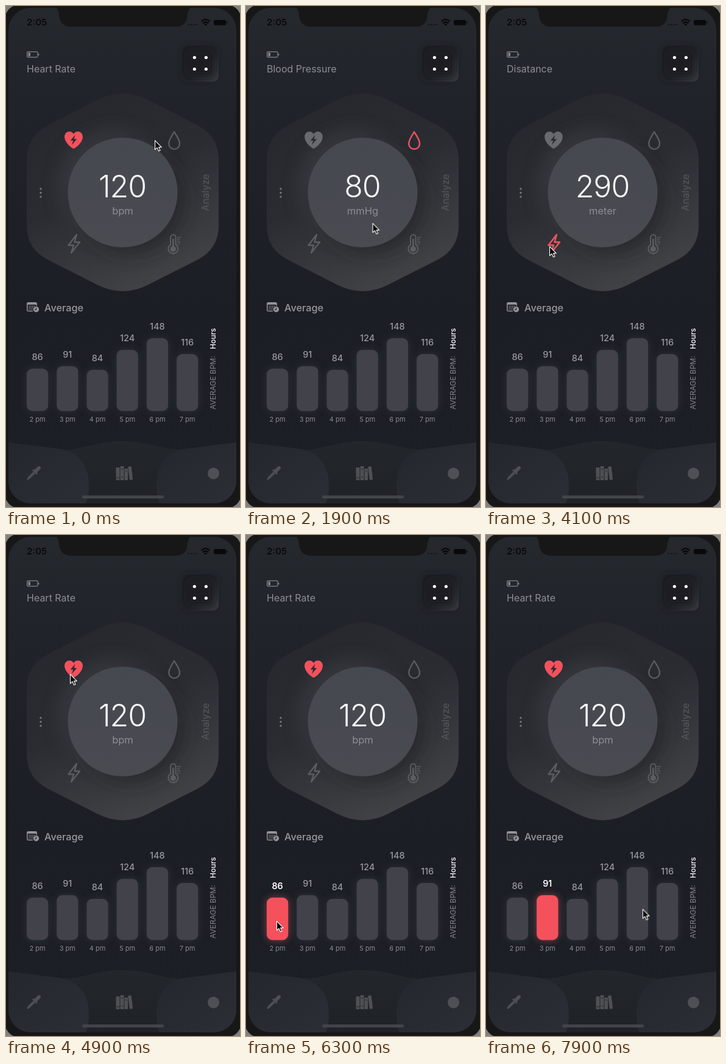
An HTML page that plays this animation: 384x822 px, repeating every 8 s.

```html
<!DOCTYPE html>
<html lang="en">
<head>
<meta charset="utf-8">
<title>Heart Rate</title>
<style>
html, body { margin: 0; width: 100%; height: 100%; overflow: hidden; background: #808080; }
svg { display: block; width: 384px; height: 822px; font-family: Inter, Roboto, "Liberation Sans", sans-serif; }
.idle { color: #5b5d62; }
.lit { color: #f4515d; }
.title { font-size: 16px; fill: #8c8e94; }
.num { font-size: 50px; font-weight: 350; letter-spacing: -1px; fill: #f7f7f8; text-anchor: middle; }
.unit { font-size: 16.5px; fill: #8c8e94; text-anchor: middle; }
.val { font-size: 14.5px; font-weight: 500; fill: #98999d; text-anchor: middle; }
.hour { font-size: 11px; fill: #8a8b90; text-anchor: middle; }
.bar { fill: #42424a; filter: drop-shadow(0 0 7px rgba(80, 82, 92, .35)); }
.on .bar { fill: #f4515d; filter: drop-shadow(0 0 6px rgba(244, 81, 93, .4)); }
.on .val { fill: #fff; }

/* Selected gauge: hard switches */
.heart, .drop, .temp, .bolt { animation: 8s step-end infinite; }
.heart { animation-name: heart; }
.drop { animation-name: drop; }
.temp { animation-name: temp; }
.bolt { animation-name: bolt; }
@keyframes heart { 0% { opacity: 1 } 15% { opacity: 0 } 61.25%, 100% { opacity: 1 } }
@keyframes drop { 0% { opacity: 0 } 15% { opacity: 1 } 31.25%, 100% { opacity: 0 } }
@keyframes temp { 0% { opacity: 0 } 31.25% { opacity: 1 } 48.75%, 100% { opacity: 0 } }
@keyframes bolt { 0% { opacity: 0 } 48.75% { opacity: 1 } 61.25%, 100% { opacity: 0 } }

/* Selected bar: short fades */
.first { animation: first 8s linear infinite; }
.second { animation: second 8s linear infinite; }
@keyframes first { 0%, 74.4% { opacity: 0 } 78.1%, 88.1% { opacity: 1 } 92%, 100% { opacity: 0 } }
@keyframes second { 0%, 88.1% { opacity: 0 } 92%, 100% { opacity: 1 } }

/* Pointer moves once per 100 ms */
.pointer { animation: move 8s infinite; }
@keyframes move {
  0% { transform: translate(244px, 220px); animation-timing-function: steps(5) }
  6.25% { transform: translate(262px, 221px); animation-timing-function: steps(4) }
  11.25% { transform: translate(286px, 220px); animation-timing-function: steps(2) }
  13.75% { transform: translate(283px, 219px); animation-timing-function: steps(1) }
  15% { transform: translate(290px, 222px); animation-timing-function: steps(1) }
  16.25% { transform: translate(285px, 221px); animation-timing-function: steps(1) }
  17.5% { transform: translate(285px, 221px); animation-timing-function: steps(2) }
  20% { transform: translate(235px, 258px); animation-timing-function: steps(2) }
  22.5% { transform: translate(179px, 322px); animation-timing-function: steps(2) }
  25% { transform: translate(236px, 390px); animation-timing-function: steps(1) }
  26.25% { transform: translate(268px, 409px); animation-timing-function: steps(2) }
  28.75% { transform: translate(279px, 400px); animation-timing-function: steps(2) }
  31.25% { transform: translate(277px, 393px); animation-timing-function: steps(3) }
  35% { transform: translate(277px, 393px); animation-timing-function: steps(2) }
  37.5% { transform: translate(282px, 403px); animation-timing-function: steps(2) }
  40% { transform: translate(262px, 398px); animation-timing-function: steps(2) }
  42.5% { transform: translate(215px, 378px); animation-timing-function: steps(2) }
  45% { transform: translate(148px, 380px); animation-timing-function: steps(2) }
  47.5% { transform: translate(110px, 390px); animation-timing-function: steps(3) }
  51.25% { transform: translate(104px, 394px); animation-timing-function: steps(1) }
  52.5% { transform: translate(104px, 394px); animation-timing-function: steps(3) }
  56.25% { transform: translate(99px, 335px); animation-timing-function: steps(3) }
  60% { transform: translate(104px, 232px); animation-timing-function: steps(3) }
  63.75% { transform: translate(107px, 220px); animation-timing-function: steps(1) }
  65% { transform: translate(106px, 219px); animation-timing-function: steps(1) }
  66.25% { transform: translate(106px, 219px); animation-timing-function: steps(1) }
  67.5% { transform: translate(121px, 330px); animation-timing-function: steps(1) }
  68.75% { transform: translate(147px, 475px); animation-timing-function: steps(1) }
  70% { transform: translate(125px, 566px); animation-timing-function: steps(2) }
  72.5% { transform: translate(72px, 612px); animation-timing-function: steps(2) }
  75% { transform: translate(48px, 632px); animation-timing-function: steps(6) }
  82.5% { transform: translate(52px, 634px); animation-timing-function: steps(2) }
  85% { transform: translate(92px, 634px); animation-timing-function: steps(1) }
  86.25% { transform: translate(105px, 631px); animation-timing-function: steps(3) }
  90% { transform: translate(108px, 632px); animation-timing-function: steps(3) }
  93.75% { transform: translate(176px, 623px); animation-timing-function: steps(5) }
  100% { transform: translate(277px, 611px) }
}
</style>
</head>
<body>
<svg viewBox="0 0 384 822">
  <defs>
    <linearGradient id="screen" x1="0" y1="0" x2="0" y2="1">
      <stop offset="0" stop-color="#25292e"/><stop offset=".2" stop-color="#202329"/>
      <stop offset=".6" stop-color="#1b1e24"/><stop offset="1" stop-color="#1c1f25"/>
    </linearGradient>
    <linearGradient id="hex" x1=".25" y1="0" x2=".7" y2="1">
      <stop offset="0" stop-color="#26282e"/><stop offset=".45" stop-color="#2b2c32"/>
      <stop offset="1" stop-color="#434447"/>
    </linearGradient>
    <linearGradient id="disc" x1="0" y1="0" x2="0" y2="1">
      <stop offset="0" stop-color="#45484f"/><stop offset="1" stop-color="#494b51"/>
    </linearGradient>
    <linearGradient id="key" x1="0" y1="0" x2="1" y2="1">
      <stop offset="0" stop-color="#1b1c20"/><stop offset=".55" stop-color="#202227"/>
      <stop offset="1" stop-color="#37393d"/>
    </linearGradient>
    <linearGradient id="lobe" x1="0" y1="0" x2="1" y2="1">
      <stop offset="0" stop-color="#24272d"/><stop offset="1" stop-color="#2c2e36"/>
    </linearGradient>
    <linearGradient id="mid" x1="0" y1="0" x2="0" y2="1">
      <stop offset="0" stop-color="#23262b"/><stop offset="1" stop-color="#1f2227"/>
    </linearGradient>
    <filter id="blur4" x="-50%" y="-50%" width="200%" height="200%"><feGaussianBlur stdDeviation="4"/></filter>
    <filter id="blur14" x="-50%" y="-50%" width="200%" height="200%"><feGaussianBlur stdDeviation="14"/></filter>
    <clipPath id="phone"><rect x="4" y="3" width="374" height="813" rx="37"/></clipPath>
    <path id="hexagon" d="M150 154Q191.500 133 233 154L313 195Q349 213 349 252V360Q349 399 313 417L233 457.500Q191.500 478.500 150 457.500L70 417Q34 399 34 360V252Q34 213 70 195Z"/>
    <clipPath id="inside"><use href="#hexagon"/></clipPath>

    <g id="i-heart">
      <path fill="currentColor" d="M111 234C109.500 234 96.200 225 96.200 214.500C96.200 209.500 99.800 206 104 206C107.200 206 109.700 207.800 111 210.300C112.300 207.800 114.800 206 118 206C122.200 206 125.800 209.500 125.800 214.500C125.800 225 112.500 234 111 234Z"/>
      <path fill="#292b31" d="M113.500 211.500L105.800 220.800H110.300L108 228L116.200 218.300H111.500Z"/>
    </g>
    <path id="i-drop" fill="none" stroke="currentColor" stroke-width="2.300" stroke-linejoin="round" d="M276 206.500C273 212 267.200 219 267.200 226A8.900 8.900 0 0 0 285 226C285 219 279 212 276 206.500Z"/>
    <path id="i-bolt" fill="none" stroke="currentColor" stroke-width="2.300" stroke-linejoin="round" d="M116 375L102.500 392.500H111L107 405L121 387.500H112.500Z"/>
    <g id="i-temp" fill="none" stroke="currentColor" stroke-width="1.900">
      <path d="M270 391.500V379.500A4.300 4.300 0 0 1 278.600 379.500V391.500A8 8 0 1 1 270 391.500Z"/>
      <circle cx="274.300" cy="398.700" r="4.700" fill="currentColor" stroke="none"/>
      <path d="M274.300 382V398" stroke-width="2.600"/>
      <path d="M281 380H286.500M281 383.500H285M281 387H286.500M281 390.500H285" stroke-width="1.700"/>
    </g>
  </defs>

  <rect x="-2" y="-2" width="388" height="826" rx="24" fill="#171718"/>
  <g clip-path="url(#phone)">
    <rect width="384" height="822" fill="url(#screen)"/>
    <path fill="#171718" d="M78 0Q86 3 87 14Q88 34 107 34H278Q297 34 298 14Q299 3 307 0Z"/>

    <path fill="url(#mid)" d="M4 716L100 728C140 724 150 714 191 714C232 714 242 724 282 728L378 716V816H4Z"/>
    <path fill="url(#lobe)" d="M4 716L88 727C122 731 136 757 136 786Q136 805 131 816H4Z"/>
    <path fill="url(#lobe)" d="M378 716L295 727C261 731 247 757 247 786Q247 805 252 816H378Z"/>
    <rect x="125" y="803" width="134" height="5" rx="2.500" fill="#424449"/>
  </g>

  <!-- status bar -->
  <g fill="#09090a">
    <text x="34" y="32" font-size="15" font-weight="600">2:05</text>
    <rect x="341" y="23" width="20" height="8.500" rx="2"/>
    <rect x="362" y="25.500" width="1.500" height="3.500" rx=".7"/>
    <path fill="none" stroke="#09090a" stroke-width="2.300" d="M320.500 25.300Q327.500 18.800 334.500 25.300M323 28.300Q327.500 24.300 332 28.300"/>
    <path d="M327.500 32.500L324.800 30Q327.500 27.800 330.200 30Z"/>
    <path stroke="#101012" stroke-width="2" stroke-dasharray="2 2.300" d="M299 30.500H314"/>
  </g>

  <!-- heading -->
  <rect x="34.600" y="75.100" width="17.400" height="9" rx="1.500" fill="none" stroke="#85868a" stroke-width="1.200"/>
  <path fill="#85868a" d="M36.300 76.800H40V82.400H36.300ZM53 78H54.200V81.300H53Z"/>
  <rect x="288" y="64" width="59" height="59" rx="10" fill="#15171a" opacity=".45" filter="url(#blur4)"/>
  <rect x="290" y="66" width="59" height="58" rx="9" fill="url(#key)"/>
  <rect x="297" y="72" width="43" height="43" rx="8" fill="#1b1d21" filter="url(#blur4)"/>
  <g fill="#fff"><circle cx="309.300" cy="84.500" r="2.600"/><circle cx="328.300" cy="84.500" r="2.600"/><circle cx="309.300" cy="103.500" r="2.600"/><circle cx="328.300" cy="103.500" r="2.600"/></g>

  <!-- gauge -->
  <use href="#hexagon" fill="url(#hex)"/>
  <g clip-path="url(#inside)">
    <circle cx="177" cy="294" r="90" fill="#44464c" opacity=".5" filter="url(#blur14)"/>
    <circle cx="206" cy="320" r="88" fill="#222328" opacity=".6" filter="url(#blur14)"/>
  </g>
  <circle cx="191.500" cy="306" r="90" fill="url(#disc)"/>
  <g fill="#73757a"><circle cx="57" cy="300" r="1.700"/><circle cx="57" cy="306.500" r="1.700"/><circle cx="57" cy="313" r="1.700"/></g>
  <text transform="translate(333 306) rotate(-90)" text-anchor="middle" font-size="16.200" fill="#55575c">Analyze</text>
  <g class="idle"><use href="#i-heart" color="#686a70"/><use href="#i-drop"/><use href="#i-bolt"/><use href="#i-temp"/></g>

  <g class="lit heart">
    <use href="#i-heart"/><text class="title" x="34" y="109">Heart Rate</text>
    <text class="num" x="191" y="314">120</text><text class="unit" x="191.500" y="342">bpm</text>
  </g>
  <g class="lit drop">
    <use href="#i-drop"/><text class="title" x="34" y="109">Blood Pressure</text>
    <text class="num" x="191" y="314">80</text><text class="unit" x="191.500" y="342">mmHg</text>
  </g>
  <g class="lit temp">
    <use href="#i-temp"/><text class="title" x="34" y="109">Temparature</text>
    <text class="num" x="191" y="314">98.7</text><text class="unit" x="191.500" y="342">degree</text>
  </g>
  <g class="lit bolt">
    <use href="#i-bolt"/><text class="title" x="34" y="109">Disatance</text>
    <text class="num" x="191" y="314">290</text><text class="unit" x="191.500" y="342">meter</text>
  </g>

  <!-- chart -->
  <g fill="none" stroke="#929397" stroke-width="1.500">
    <path d="M44 500.500H36.500Q34.800 500.500 34.800 498.800V488.500Q34.800 486.800 36.500 486.800H48.500Q50.200 486.800 50.200 488.500V492"/>
    <path d="M35 488.500H50" stroke-width="3"/>
    <path d="M37.500 492.500H48M37.500 495H45M37.500 497.500H44" stroke-dasharray="1.500 1.200"/>
    <circle cx="49.500" cy="497.800" r="4.700" fill="#929397" stroke="none"/>
    <path d="M49.500 495V498.200H47" stroke="#1c1f24" stroke-width="1.100"/>
  </g>
  <text x="63" y="501" font-size="16.300" font-weight="500" fill="#98999d">Average</text>
  <g id="chart"></g>
  <text transform="translate(344 662) rotate(-90)" font-size="12" fill="#85868b">AVERAGE BPM:</text>
  <text transform="translate(344 563) rotate(-90)" font-size="12" font-weight="500" fill="#fff">Hours</text>

  <!-- tab icons -->
  <g fill="#4e5054">
    <path d="M46.500 761.500L49 759L52 756Q54.500 754 56.300 755.800Q58 757.600 56 760L53 763L50.500 765.500L52 767L50 769L43 762L45 760Z"/>
    <path fill="none" stroke="#4e5054" stroke-width="2" d="M45.500 765L37.500 773L35 777L39 774.500L47 766.500"/>
    <rect x="180.500" y="757" width="6" height="21" rx="1"/>
    <rect x="187.500" y="755" width="6" height="23" rx="1"/>
    <rect x="194.500" y="759" width="5.500" height="19" rx="1"/>
    <rect x="201.500" y="755.500" width="5.500" height="22" rx="1" transform="rotate(-7 204 767)"/>
    <path stroke="#24262b" stroke-width="1.200" fill="none" d="M189 760H192.500M189 773H192.500M196 763H199M181 774H186"/>
    <circle cx="340.500" cy="767" r="9.500"/>
  </g>

  <g class="pointer">
    <path d="M.5 .7V15.700L4 12.500L6.500 18L9 16.900L6.600 11.600H11.200Z" fill="#050505" stroke="#fff" stroke-width="1.100" stroke-linejoin="round"/>
  </g>
</svg>
<script>
const beats = [86, 91, 84, 124, 148, 116];
const tops = [595, 591, 597, 564.3, 545, 571];
const column = (i, cls) => {
  const x = 34 + i * 49.2, mid = x + 17.6;
  return `<g class="${cls}"><rect class="bar" x="${x}" y="${tops[i]}" width="35.2" height="${664.5 - tops[i]}" rx="9"/>` +
    `<text class="val" x="${mid}" y="${tops[i] - 14.2}">${beats[i]}</text></g>` +
    (cls ? '' : `<text class="hour" x="${mid}" y="682">${i + 2} pm</text>`);
};
document.getElementById('chart').innerHTML =
  beats.map((_, i) => column(i, '')).join('') + column(0, 'on first') + column(1, 'on second');
</script>
</body>
</html>
```
